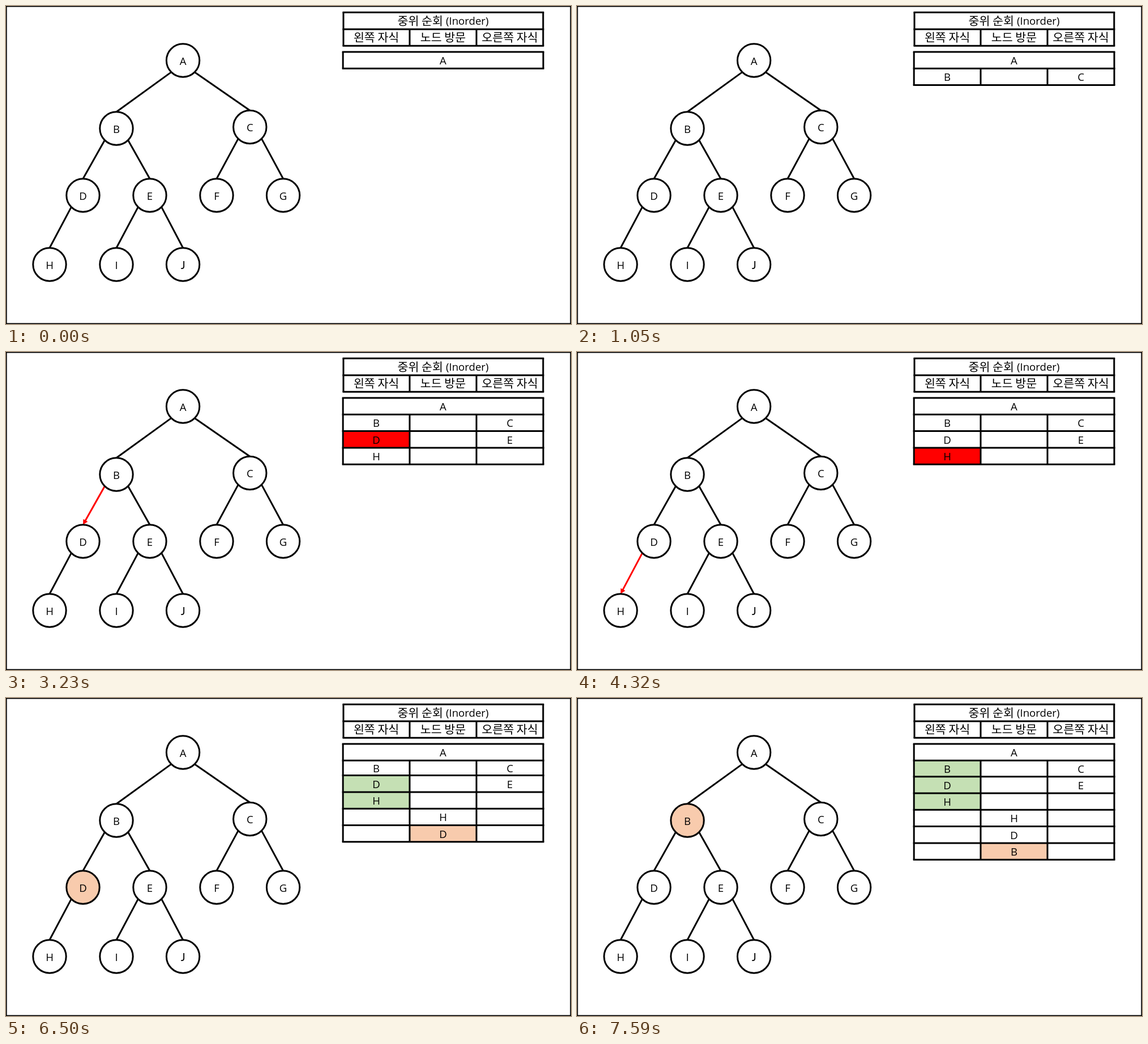
Recreate the animation shown at these times as an HTML page with a canvas. Size 998 by 561 pixels, loop 8000 ms.

```html
<!DOCTYPE html>
<html lang="ko">
<head>
<meta charset="utf-8">
<title>Inorder traversal</title>
<style>
  html, body { margin: 0; width: 100%; height: 100%; overflow: hidden; background: #fff; }
  canvas { display: block; }
</style>
</head>
<body>
<canvas id="stage" width="998" height="561"></canvas>
<script>
const ctx = document.getElementById('stage').getContext('2d');
const LOOP = 8000, RADIUS = 29.2, LINE = 3;
const BLACK = '#000', RED = '#ff0000', GREEN = '#c5e0b4', ORANGE = '#f8cbad';
const LATIN = '18.6px "Open Sans", "Noto Sans", sans-serif';
const LATIN_J = '18.6px Lato, sans-serif';
const HANGUL = '20.6px "Noto Sans CJK KR", "Noto Sans CJK JP", "Noto Sans CJK", sans-serif';

const nodes = {
  A: [312.6, 96], B: [195, 216], C: [430.8, 213.5], D: [136, 334], E: [254, 334],
  F: [372, 334], G: [489.6, 334], H: [77, 456], I: [195, 456], J: [312.6, 456]
};
const edges = ['AB', 'AC', 'BD', 'BE', 'CF', 'CG', 'DH', 'EI', 'EJ'];
const cols = [595.2, 713, 831, 949];

// Each row holds the left, visit and right cells; "_" is empty.
// paint maps "row,column" to a cell colour; first is the height of the first row below the root.
const steps = [
  { at: 0, rows: [] },
  { at: 1050, rows: ['B_C'] },
  { at: 2140, rows: ['B_C', 'D_E'], edge: 'AB', paint: { '0,0': RED } },
  { at: 3230, rows: ['B_C', 'D_E', 'H__'], edge: 'BD', paint: { '1,0': RED } },
  { at: 4320, rows: ['B_C', 'D_E', 'H__'], edge: 'DH', paint: { '2,0': RED } },
  { at: 5410, rows: ['B_C', 'D_E', 'H__', '_H_'], visit: 'H', first: 29,
    paint: { '2,0': GREEN, '3,1': ORANGE } },
  { at: 6500, rows: ['B_C', 'D_E', 'H__', '_H_', '_D_'], visit: 'D', first: 26.4,
    paint: { '1,0': GREEN, '2,0': GREEN, '4,1': ORANGE } },
  { at: 7590, rows: ['B_C', 'D_E', 'H__', '_H_', '_D_', '_B_'], visit: 'B', first: 28.5,
    paint: { '0,0': GREEN, '1,0': GREEN, '2,0': GREEN, '5,1': ORANGE } }
];

function line(x1, y1, x2, y2, color = BLACK) {
  ctx.strokeStyle = color;
  ctx.lineWidth = LINE;
  ctx.beginPath();
  ctx.moveTo(x1, y1);
  ctx.lineTo(x2, y2);
  ctx.stroke();
}

function text(str, x, y, font, align = 'center') {
  ctx.font = font;
  ctx.textAlign = align;
  ctx.fillStyle = BLACK;
  ctx.fillText(str, x, y);
}

function letter(ch, x, y) {
  text(ch, x, y + 6.8, ch === 'J' ? LATIN_J : LATIN);
}

function arrow(x1, y1, x2, y2) {
  const angle = Math.atan2(y2 - y1, x2 - x1);
  const length = Math.hypot(x2 - x1, y2 - y1);
  ctx.save();
  ctx.translate(x2, y2);
  ctx.rotate(angle);
  line(-length, 0, -7, 0, RED);
  ctx.fillStyle = RED;
  ctx.beginPath();
  ctx.moveTo(0, 0);
  ctx.lineTo(-9, -4.6);
  ctx.lineTo(-9, 4.6);
  ctx.fill();
  ctx.restore();
}

function drawTree(step) {
  for (const edge of edges) {
    const [px, py] = nodes[edge[0]], [cx, cy] = nodes[edge[1]];
    const off = RADIUS * Math.SQRT1_2;
    const draw = edge === step.edge ? arrow : line;
    draw(px + Math.sign(cx - px) * off, py + off, cx, cy - RADIUS);
  }
  ctx.lineWidth = LINE;
  ctx.strokeStyle = BLACK;
  for (const [name, [x, y]] of Object.entries(nodes)) {
    ctx.fillStyle = name === step.visit ? ORANGE : '#fff';
    ctx.beginPath();
    ctx.arc(x, y, RADIUS, 0, Math.PI * 2);
    ctx.fill();
    ctx.stroke();
    letter(name, x, y + 0.8);
  }
}

function grid(left, right, ys) {
  for (const y of ys) line(left - LINE / 2, y, right + LINE / 2, y);
  const end = ys[ys.length - 1];
  for (const x of [left, right]) line(x, ys[0], x, end);
  for (const x of cols.slice(1, 3)) line(x, ys[1], x, end);
}

const middle = c => (cols[c] + cols[c + 1]) / 2;

function drawHeader() {
  grid(596, 948.8, [11.3, 41, 70.2]);
  text('중위 순회', 691.5, 33.8, HANGUL, 'left');
  text('(Inorder)', 777, 33.4, LATIN, 'left');
  ['왼쪽 자식', '노드 방문', '오른쪽 자식'].forEach((s, c) => text(s, middle(c), 62.8, HANGUL));
}

function drawTable({ rows, paint = {}, first = 29.4 }) {
  const ys = [81, 110.2];
  rows.forEach((_, r) => ys.push(110.2 + first + r * 29.3));
  rows.forEach((row, r) => {
    const top = ys[r + 1], bottom = ys[r + 2];
    for (let c = 0; c < 3; c++) {
      const color = paint[r + ',' + c];
      if (color) {
        ctx.fillStyle = color;
        ctx.fillRect(cols[c], top, cols[c + 1] - cols[c], bottom - top);
      }
      if (row[c] !== '_') letter(row[c], middle(c), (top + bottom) / 2 + 0.7);
    }
  });
  letter('A', middle(1), 96.4);
  grid(cols[0], cols[3], ys);
}

function frame() {
  const t = performance.now() % LOOP;
  const step = steps.filter(s => s.at <= t).pop();
  ctx.fillStyle = '#fff';
  ctx.fillRect(0, 0, 998, 561);
  ctx.strokeStyle = BLACK;
  ctx.lineWidth = 1.6;
  ctx.strokeRect(0.8, 0.8, 996.4, 559.4);
  drawTree(step);
  drawHeader();
  drawTable(step);
  requestAnimationFrame(frame);
}
frame();
</script>
</body>
</html>
```
